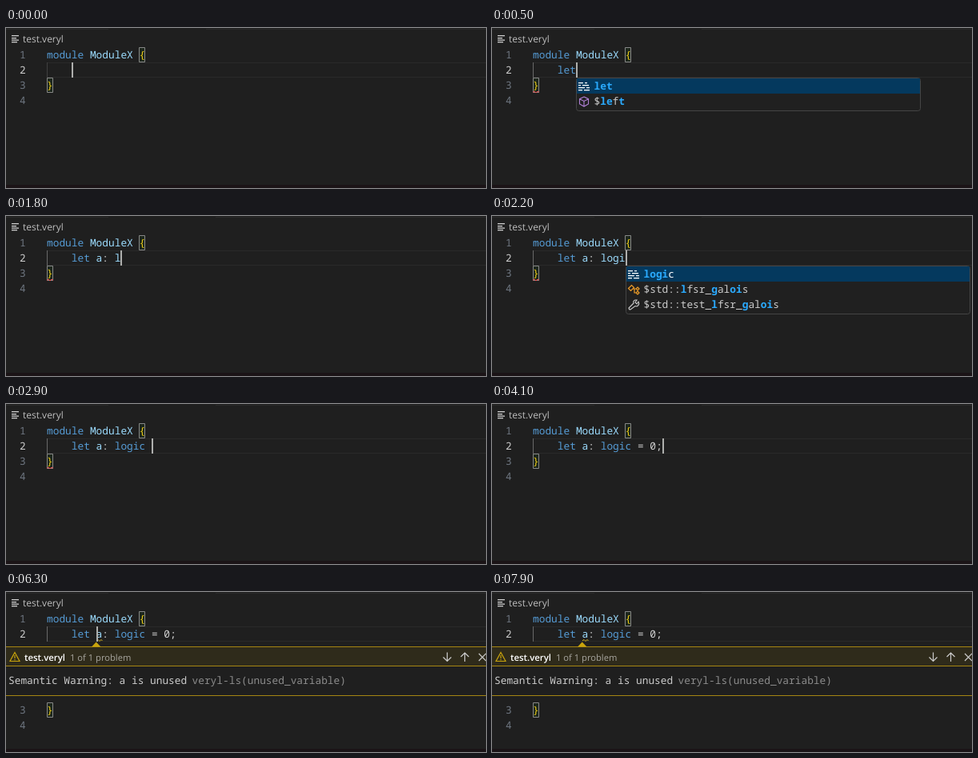
Recreate the animation shown at these times as an HTML page with a canvas. Size 600 px wide and 200 px high, loop 8 s.

```html
<!DOCTYPE html>
<html lang="en">
<head>
<meta charset="utf-8">
<title>Code completion</title>
<style>
  html, body { margin: 0; width: 100%; height: 100%; overflow: hidden; background: #1f1f1f; }
  canvas { display: block; }
</style>
</head>
<body>
<canvas id="stage" width="600" height="200"></canvas>
<script>
const ctx = document.getElementById('stage').getContext('2d');
ctx.textRendering = 'geometricPrecision';

const LOOP = 8000, CHAR = 7.7, LINE = 19, LEFT = 51, TOP = 24;
const MONO = '12.83px "Noto Sans Mono", monospace';
const BLUE = '#569cd6', PALE = '#9cdcfe', TEXT = '#cccccc', GOLD = '#c9a40c';
const PANEL_AT = 6000, ERROR_FROM = 200, ERROR_TO = 4100, WARNING_AT = 4200;

// [time, text typed on line 2]
const typing = [
  [0, ''], [100, 'l'], [200, 'le'], [400, 'let'], [700, 'let '], [1000, 'let a'],
  [1300, 'let a:'], [1600, 'let a: '], [1800, 'let a: l'], [2000, 'let a: lo'],
  [2100, 'let a: log'], [2200, 'let a: logi'], [2500, 'let a: logic'],
  [2800, 'let a: logic '], [3200, 'let a: logic = '], [3600, 'let a: logic = 0'],
  [4000, 'let a: logic = 0;']
];

// Suggestions: icon kind, then the label with matched letters between stars.
const popups = [
  [300, 'k*le*t', 'f$*le*ft', 'k*el*se', 'k*el*sif', 'c$std::d*el*ay'],
  [400, 'k*let*', 'f$*le*f*t*'],
  [700],
  [1100, 'k*a*lways_comb', 'k*a*lways_ff', 'k*a*s', 'k*a*ssign', 'f$*a*cos', 'f$*a*cosh',
    'f$*a*sin', 'f$*a*sinh', 'f$*a*tan'],
  [1300],
  [1900, 'k*l*et', 'k*l*ocal', 'k*l*ogic', 'k*l*sb', 'f$*l*eft', 'f$*l*n', 'f$*l*og10', 'f$*l*ow'],
  [2000, 'k*lo*cal', 'k*lo*gic', 'f$*lo*g10', 'f$*lo*w', 'c$std::*l*fsr_gal*o*is', 'w$std::test_*l*fsr_gal*o*is'],
  [2100, 'k*log*ic', 'f$*log*10', 'c$std::*l*fsr_*g*al*o*is', 'w$std::test_*l*fsr_*g*al*o*is'],
  [2200, 'k*logi*c', 'c$std::*l*fsr_*g*al*oi*s', 'w$std::test_*l*fsr_*g*al*oi*s'],
  [2500, 'k*logic*'],
  [2800]
];

// [time, visible]
const cursorBlink = [
  [0, true], [4500, false], [5000, true], [5400, false], [5900, true],
  [6500, false], [7000, true], [7500, false]
];

const latest = (list, t) => list.filter(entry => entry[0] <= t).pop();

function rect(x, y, w, h, color) {
  ctx.fillStyle = color;
  ctx.fillRect(x, y, w, h);
}

function text(s, x, y, color, font = MONO) {
  ctx.font = font;
  ctx.fillStyle = color;
  ctx.fillText(s, x, y);
}

function stroke(path, color, x = 0, y = 0, width = 1) {
  ctx.save();
  ctx.translate(x, y);
  ctx.strokeStyle = color;
  ctx.lineWidth = width;
  ctx.stroke(new Path2D(path));
  ctx.restore();
}

function code(s, x, y) {
  for (const { 0: token, index } of s.matchAll(/[A-Za-z]+|[{}]|[^A-Za-z{}\s]+/g)) {
    const color = /^(let|module|logic)$/.test(token) ? BLUE
      : /[A-Za-z]/.test(token) ? PALE
      : /[{}]/.test(token) ? '#e8c814' : '#d4d4d4';
    text(token, x + index * CHAR, y, color);
  }
}

function bracketBox(x, y) {
  rect(x, y, 8, LINE, '#1d271d');
  stroke('M.5 .5h7v18h-7z', '#888888', x, y);
}

const icons = {
  k(x, y, selected) {
    const color = selected ? '#ffffff' : TEXT;
    for (const [dx, dy, w] of [[-7, -5, 6], [1, -5, 3], [-7, -2, 3], [-2, -2, 8],
      [-7, 1, 8], [3, 1, 4], [-7, 4, 5], [0, 4, 7]]) rect(x + dx, y + dy, w, 1.3, color);
  },
  f(x, y) {
    stroke('M0-6L5.5-3.3V3L0 6L-5.5 3V-3.3ZM-5.5-3.3L0-.6L5.5-3.3M0-.6V6', '#b180d7', x, y, 1.1);
  },
  c(x, y) {
    stroke('M-6.5-1.5L-2.5-5.5L.5-2.5L-3.5 1.5ZM-1-1H3M1-1V4H3M5-3L7-1L5 1L3-1ZM5 2L7 4L5 6L3 4Z',
      '#ee9d28', x, y, 1.2);
  },
  w(x, y) {
    stroke('M-6 4L0-2Q-1-5 2-6L4-6L2-3L4-1L6-4Q8 0 4 2L2 1.5L-4 6Q-6 6-6 4Z', TEXT, x, y, 1.1);
  }
};

function drawPopup(items, x) {
  const y = 62, w = 431, h = items.length * LINE + 4;
  ctx.beginPath();
  ctx.roundRect(x + .5, y + .5, w - 1, h - 1, 3);
  ctx.fillStyle = '#202020';
  ctx.fill();
  ctx.strokeStyle = '#454545';
  ctx.lineWidth = 1;
  ctx.stroke();
  rect(x + 1, y + 1, w - 2, LINE, '#04395e');
  items.forEach((item, row) => {
    const rowY = y + 1 + row * LINE;
    icons[item[0]](x + 10, rowY + 10, row === 0);
    let labelX = x + 22.5;
    item.slice(1).split('*').forEach((part, i) => {
      const matched = i % 2 === 1;
      text(part, labelX, rowY + 14, matched ? '#2aaaff' : row ? TEXT : '#ffffff',
        matched ? 'bold ' + MONO : MONO);
      labelX += part.length * CHAR;
    });
  });
  if (items.length > 7) rect(x + w - 11, y + 1, 10, 66, '#4f4f4f');
}

function drawPanel() {
  rect(0, 68, 600, 62, '#1f1f1f');
  rect(0, 69, 600, 23, '#2f2b1b');
  for (const y of [68, 92, 129]) rect(0, y, 600, 1, '#a58512');
  ctx.fillStyle = GOLD;
  ctx.fill(new Path2D('M107 68.5L112.7 62.5L118.5 68.5Z'));
  stroke('M11 75.5L17 86.5H5ZM11 79V83M11 84V85.3', GOLD, 0, 0, 1.2);
  text('test.veryl', 23, 85.5, '#ffffff', '600 11.4px "Open Sans", sans-serif');
  text('1 of 1 problem', 80, 85.5, '#a8a69f', '11.2px "Open Sans", sans-serif');
  stroke('M551.5 75.5V86.5M546.5 81.5L551.5 86.5L556.5 81.5', TEXT, 0, 0, 1.2);
  stroke('M573.5 87V76M568.5 81L573.5 76L578.5 81', TEXT, 0, 0, 1.2);
  stroke('M591 77L600 86M600 77L591 86', TEXT, 0, 0, 1.2);
  text('Semantic Warning: a is unused', 3, 115, TEXT);
  text('veryl-ls(unused_variable)', 232.5, 115, '#8c8c8c');
}

function drawTitle(typed) {
  const tabEnd = typed ? 262 : 250;
  rect(0, 1, 128, 1, '#2a2a2a');
  rect(tabEnd, 1, 600 - tabEnd, 1, '#2a2a2a');
  [[9, 9], [12, 6], [14.5, 9], [17, 7]].forEach(([y, w]) => rect(7, y, w, 1.3, TEXT));
  text('test.veryl', 21, 18, '#bdbdbd', '12px "Open Sans", sans-serif');
}

function draw(t) {
  const typed = latest(typing, t)[1];
  const panel = t >= PANEL_AT;
  const shift = panel ? 4 * LINE : 0;
  const rowY = row => TOP + row * LINE + (row > 1 ? shift : 0);

  rect(0, 0, 600, 200, '#1f1f1f');
  rect(0, 196, 600, 4, '#1b1417');
  drawTitle(typed);

  rect(LEFT, 43, 549, 1, '#2a2a2a');
  rect(LEFT, 61, 549, 1, '#2a2a2a');
  rect(LEFT, 43, 1, LINE, typed ? '#686868' : '#404040');

  for (let row = 0; row < 4; row++)
    text(row + 1, 17, rowY(row) + 14, row === 1 ? TEXT : '#6e7681');

  bracketBox(166, TOP);
  bracketBox(LEFT, rowY(2));
  code('module ModuleX {', LEFT, rowY(0) + 14);
  code(typed, LEFT + 4 * CHAR, rowY(1) + 14);
  code('}', LEFT, rowY(2) + 14);

  if (t >= ERROR_FROM && t < ERROR_TO)
    stroke('M51 80.5L53 79L55 81L57 79L59 80.5', '#f14c4c');
  if (t >= WARNING_AT)
    stroke('M113 61L115 59.5L117 61.5L119 59.5L120.5 61', '#d8b520');
  if (panel) drawPanel();

  const column = panel ? 8 : 4 + typed.length;
  const cursorX = Math.round(LEFT + column * CHAR);
  if (latest(cursorBlink, t)[1]) rect(cursorX, 43, 2, LINE, '#aeafad');

  const items = (latest(popups, t) || []).slice(1);
  if (items.length) drawPopup(items, Math.round(LEFT + column * CHAR + .4));
}

function frame(now) {
  draw(now % LOOP);
  requestAnimationFrame(frame);
}
draw(0);
requestAnimationFrame(frame);
</script>
</body>
</html>
```
